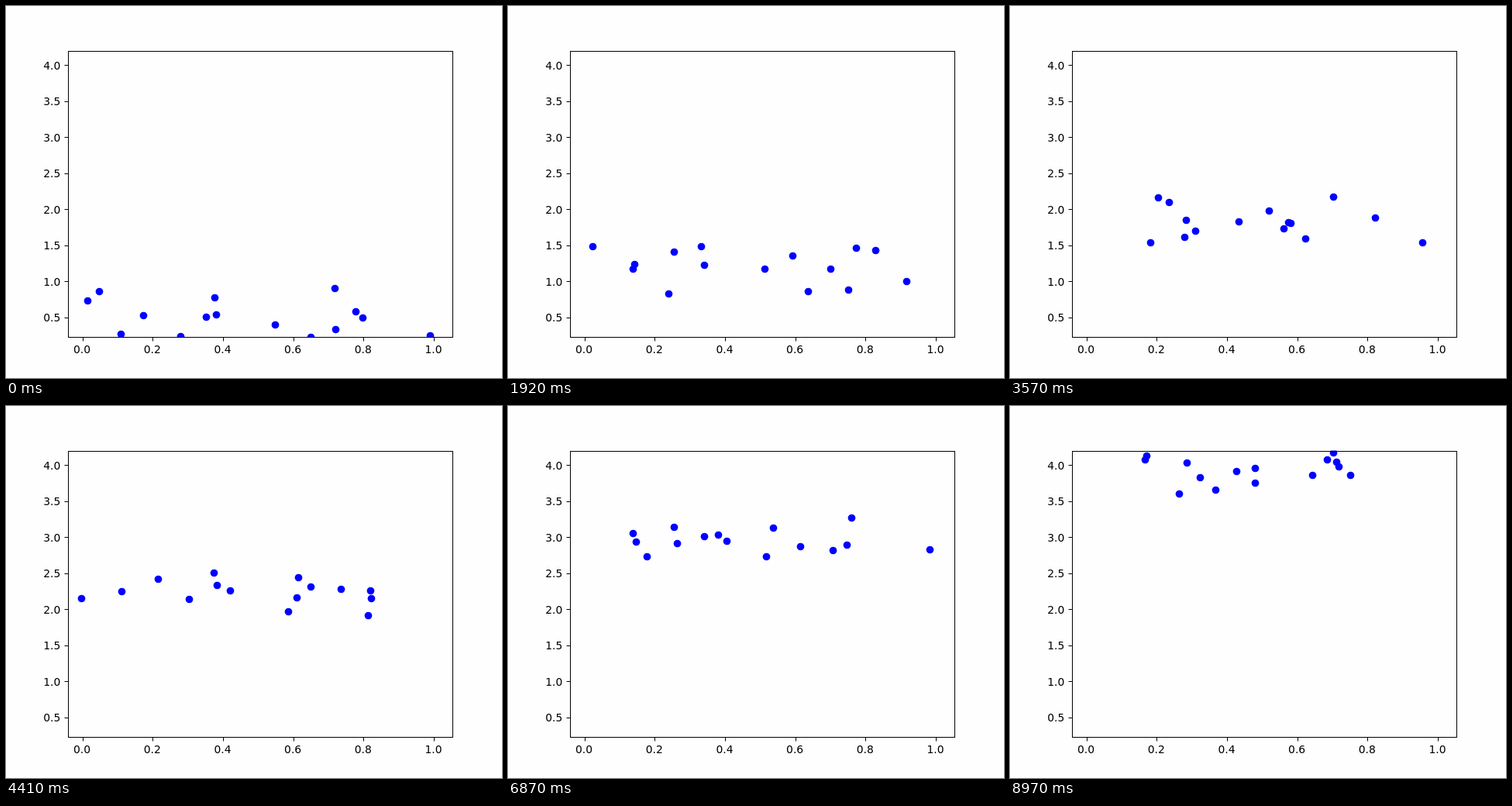
An HTML page that plays this animation: 640x480 px, repeating every 9000 ms.

```html
<!DOCTYPE html>
<html lang="en">
<head>
<meta charset="utf-8">
<title>Drifting swarm</title>
<style>
  html, body { margin: 0; width: 100%; height: 100%; overflow: hidden; background: #fefefe; }
  svg { display: block; }
  text { font: 13.89px "DejaVu Sans", sans-serif; }
</style>
</head>
<body>
<svg id="plot" width="640" height="480" viewBox="0 0 640 480">
  <clipPath id="area"><rect x="80" y="57.6" width="496" height="369.6"/></clipPath>
  <g id="swarm" fill="#00f" clip-path="url(#area)"></g>
  <rect x="80.5" y="58.5" width="496" height="369" fill="none" stroke="#000"/>
</svg>
<script>
const LOOP = 9000, STEP = 30;
const CENTER = { x: 316, y: 400.7 }, REACH = { x: 240, y: 42 };
const RISE = 34.6; // pixels per second

// Where the dots start
const STARTS = [
  [105, 380], [120, 368], [148, 423], [177, 399], [225, 426],
  [258, 401], [269, 376], [271, 398], [347, 411], [393, 427],
  [424, 364], [425, 417], [451, 394], [460, 402], [547, 425]
];

const plot = document.getElementById('plot');
const swarm = document.getElementById('swarm');

function add(parent, tag, attrs, text = '') {
  const el = document.createElementNS('http://www.w3.org/2000/svg', tag);
  for (const name in attrs) el.setAttribute(name, attrs[name]);
  el.textContent = text;
  parent.append(el);
  return el;
}

for (let i = 0; i < 6; i++) {
  const x = 98.6 + 90.68 * i;
  add(plot, 'rect', { x: Math.round(x), y: 428, width: 1, height: 4.5 });
  add(plot, 'text', { x: x - 0.5, y: 448, 'text-anchor': 'middle' }, (i / 5).toFixed(1));
}
for (let i = 0; i < 8; i++) {
  const y = 401.8 - 46.53 * i;
  add(plot, 'rect', { x: 75.5, y: Math.round(y), width: 4.5, height: 1 });
  add(plot, 'text', { x: 70.3, y: Math.ceil(y + 5), 'text-anchor': 'end' }, ((i + 1) / 2).toFixed(1));
}

let seed = 2718;
function random() {
  seed = seed * 16807 % 2147483647;
  return seed / 2147483647;
}

// A swing about the rising centre that never leaves its reach
function swing(offset, reach) {
  const side = (random() * 2 - 1) * 0.75 * Math.sqrt(reach ** 2 - offset ** 2);
  const speed = 1.1 + random() * 0.9;
  return s => offset * Math.cos(speed * s) + side * Math.sin(speed * s);
}

const dots = STARTS.map(([x, y]) => ({
  el: add(swarm, 'circle', { r: 4.86 }),
  x: swing(x - CENTER.x, REACH.x),
  y: swing(y - CENTER.y, REACH.y)
}));

const snap = v => Math.round(v) + 0.5;

function draw(s) {
  for (const { el, x, y } of dots) {
    el.setAttribute('cx', snap(CENTER.x + x(s)));
    el.setAttribute('cy', snap(CENTER.y - RISE * s + y(s)));
  }
}

const start = performance.now();
function tick() {
  const t = (performance.now() - start) % LOOP;
  draw(Math.floor(t / STEP) * STEP / 1000);
  requestAnimationFrame(tick);
}
tick();
</script>
</body>
</html>
```
